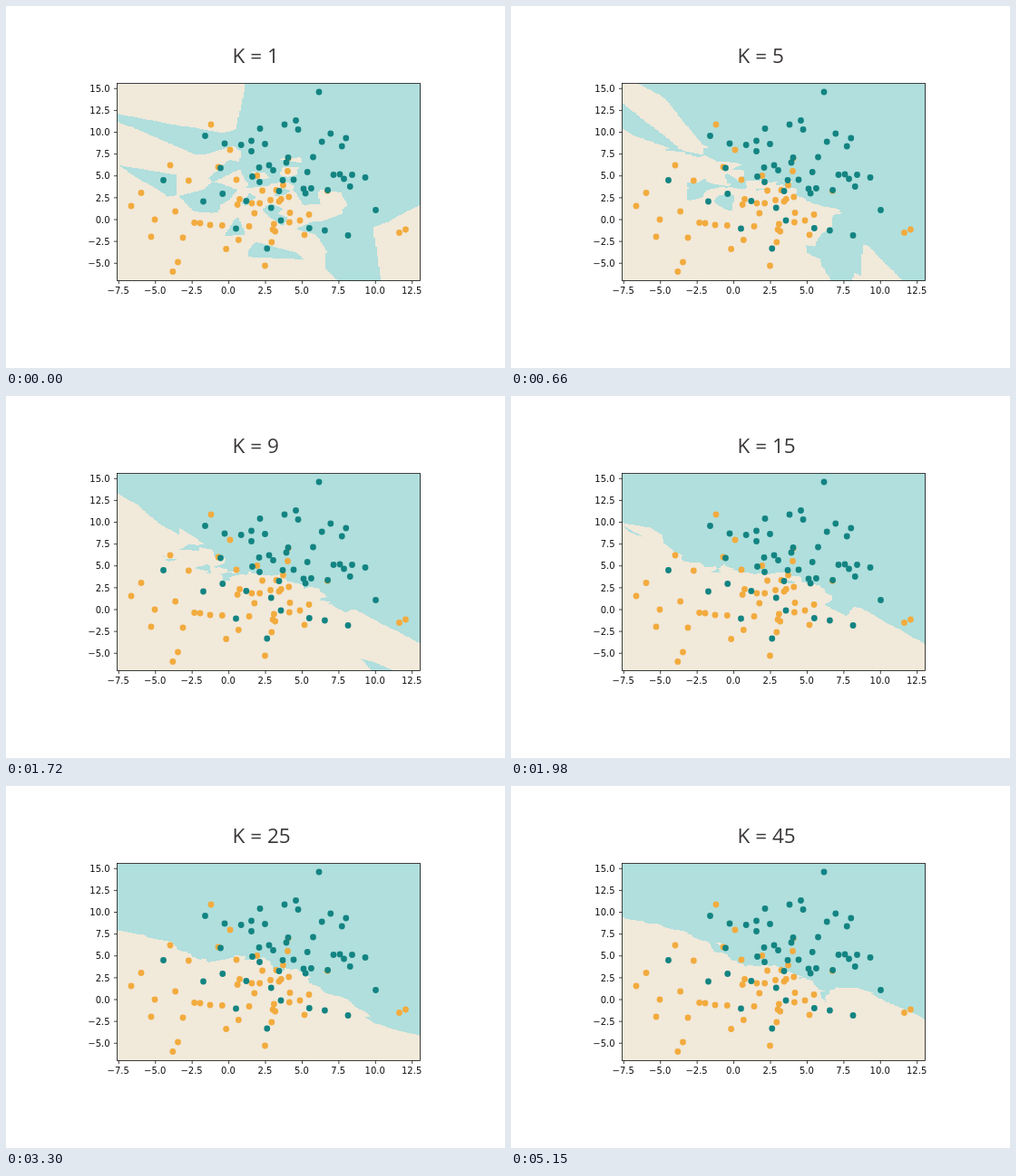
An HTML page with a canvas for the animation above (5940 ms loop, 550 px wide and 400 px high).

```html
<!DOCTYPE html>
<html lang="en">
<head>
<meta charset="utf-8">
<title>Nearest neighbour regions</title>
<style>
  html, body { margin: 0; width: 100%; height: 100%; overflow: hidden; background: #fff; }
  #stage { position: relative; width: 550px; height: 400px; overflow: hidden; }
  svg { position: absolute; left: 0; top: 0; }
  .panel { position: absolute; inset: 0; animation: brief 5940ms step-end infinite; }
  .panel:last-of-type { animation-name: long; }
  canvas { position: absolute; image-rendering: pixelated; }
  .title { font: 22.5px "Open Sans", "Noto Sans", sans-serif; fill: #3b3739; }
  .ticks text { font: 10px "DejaVu Sans", sans-serif; fill: #111; }
  .ticks path, .frame { fill: none; stroke: #111; stroke-width: .8; }
  @keyframes brief { 0% { visibility: visible; } 11.1111%, 100% { visibility: hidden; } }
  @keyframes long { 0% { visibility: visible; } 33.3333%, 100% { visibility: hidden; } }
</style>
</head>
<body>
<div id="stage"></div>
<script>
const stage = document.getElementById('stage');
const ks = [1, 5, 9, 15, 19, 25, 45];
const stepMs = 660, loopMs = 5940;
const plot = { x: 122.5, y: 85.5, w: 334, h: 218 };
const unit = { x: 16.17, y: 9.65 };   // pixels per data unit
const zero = { x: 245.6, y: 236 };
const grid = { w: 207, h: 225 };
const fills = [[241, 233, 218], [176, 223, 221]];
const inks = ['#f2ab3e', '#138482'];

// Each band spaces its samples evenly from one x to the next: "from to: heights"
const bands = [
  `138 160: 221 206.5 255 / 164 164: 236 / 181 189.5: 176 293.5 227 283 / 195 214: 256 193 239.5 240
   / 225 226: 242 131 / 234 247: 178 242.5 268.5 159 / 254 257.5: 192 219.5 258.5 213.5
   / 268 285.5: 243.5 218 229 187.5 218 204 287 / 291.5 298: 214.5 261 247 241 249 203.5
   / 301 305.5: 216 213.5 198 / 310.5 313: 182.5 168.3 211 239 228.5 / 324 334: 237 253 230.5
   / 354.3 354.3: 204.3 / 433.5 440.5: 250.5 247`,
  `173.5 173.5: 192.5 / 217.5 219.5: 216 143.5 / 236.5 241: 179 207.5 152 / 253.5 270.5: 246 153.5 215.5 149
   / 270.5 271.5: 160.5 188.5 / 279 280: 178.5 194.5 135.5 / 285.5 294.5: 152.5 268 176 223 181.5
   / 301 311: 204.5 237 192.5 131 173 167.5 / 317 322: 192 126.5 136.5
   / 328 338.5: 202 207 183.5 245.5 201.5 167 / 345 361: 95 150 248 203.5 141 186.5
   / 368 381.5: 186 155 191 146 253.5 199.5 186.5 / 396 407.5: 189.5 225.5`
];

const numbers = s => s.trim().split(/\s+/).map(Number);

function spread(band, cls) {
  const [[from, to], ys] = band.split(':').map(numbers);
  const gap = (to - from) / Math.max(1, ys.length - 1);
  return ys.map((y, i) => ({ x: from + i * gap, y, cls }));
}

const samples = bands.flatMap((text, cls) => text.split('/').flatMap(b => spread(b, cls)));

function makePanel(k, i) {
  const panel = document.createElement('div');
  panel.className = 'panel';
  panel.style.animationDelay = i * stepMs - loopMs + 'ms';
  const canvas = document.createElement('canvas');
  canvas.width = grid.w;
  canvas.height = grid.h;
  canvas.style.cssText =
    `left:${plot.x}px; top:${plot.y}px; width:${plot.w}px; height:${plot.h}px`;
  panel.append(canvas);
  panel.insertAdjacentHTML('beforeend',
    `<svg width="550" height="400"><text class="title" x="249.6" y="63.4">K = ${k}</text></svg>`);
  const ctx = canvas.getContext('2d');
  return { panel, ctx, image: ctx.createImageData(grid.w, grid.h) };
}

// Colour each cell by the majority class among its k nearest samples
function paintRegions(panels) {
  const keys = new Int32Array(samples.length);
  for (let row = 0; row < grid.h; row++) {
    const y = plot.y + (row + .5) * plot.h / grid.h;
    for (let col = 0; col < grid.w; col++) {
      const x = plot.x + (col + .5) * plot.w / grid.w;
      samples.forEach((p, i) => {
        const dx = (p.x - x) / unit.x, dy = (p.y - y) / unit.y;
        keys[i] = Math.round((dx * dx + dy * dy) * 1e5) * 2 + p.cls;  // low bit holds the class
      });
      keys.sort();
      let votes = 0, n = 0;
      ks.forEach((k, i) => {
        while (n < k) votes += keys[n++] & 1;
        const fill = fills[votes * 2 > k ? 1 : 0];
        panels[i].image.data.set([...fill, 255], (row * grid.w + col) * 4);
      });
    }
  }
  panels.forEach(p => p.ctx.putImageData(p.image, 0, 0));
}

function overlay() {
  const bottom = plot.y + plot.h;
  const label = v => v.toFixed(1).replace('-', '\u2212');
  let ticks = '';
  for (let v = -7.5; v <= 12.5; v += 2.5) {
    const x = zero.x + v * unit.x;
    ticks += `<path d="M${x} ${bottom}v3.5"/><text x="${x - .6}" y="317.6" text-anchor="middle">${label(v)}</text>`;
  }
  for (let v = -5; v <= 15; v += 2.5) {
    const y = zero.y - v * unit.y;
    ticks += `<path d="M${plot.x} ${y}h-3.5"/><text x="114.6" y="${y + 3.7}" text-anchor="end">${label(v)}</text>`;
  }
  const dots = samples.map(p => `<circle cx="${p.x}" cy="${p.y}" r="3.4" fill="${inks[p.cls]}"/>`);
  return `<svg width="550" height="400">${dots.join('')}
    <rect class="frame" x="${plot.x}" y="${plot.y}" width="${plot.w}" height="${plot.h}"/>
    <g class="ticks">${ticks}</g></svg>`;
}

const panels = ks.map(makePanel);
paintRegions(panels);
stage.append(...panels.map(p => p.panel));
stage.insertAdjacentHTML('beforeend', overlay());
</script>
</body>
</html>
```
